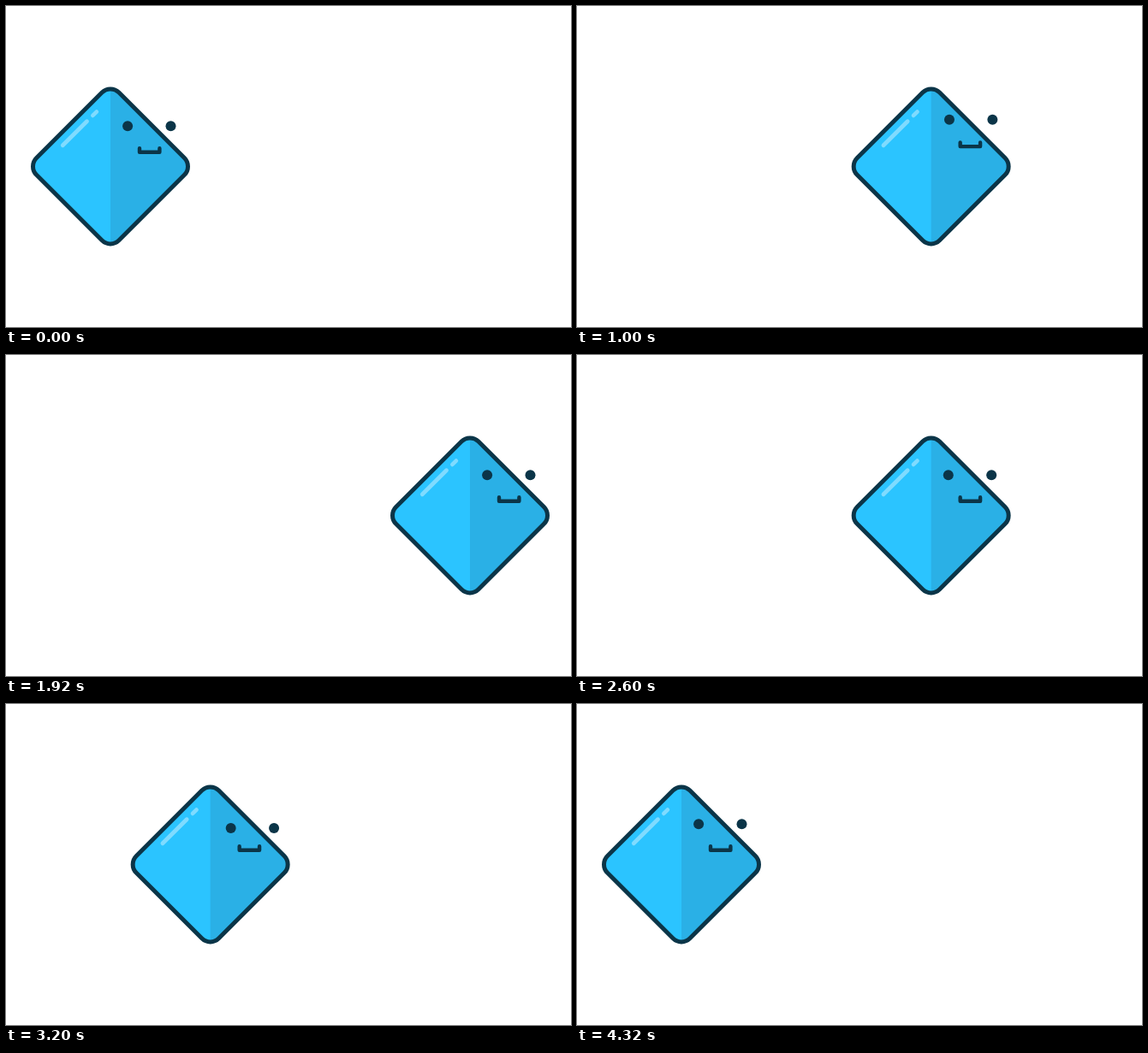
An HTML page with a canvas that plays this animation: 660x375 px, repeating every 4360 ms.

```html
<!DOCTYPE html>
<html>
<head>
<meta charset="utf-8">
<style>
  html, body { margin: 0; width: 100%; height: 100%; overflow: hidden; background: #fff; }
  canvas { display: block; }
</style>
</head>
<body>
<canvas id="stage" width="660" height="375"></canvas>
<script>
const ctx = document.getElementById('stage').getContext('2d');
const LOOP = 4360, STEP = 40, TRAVEL = 1440, TURN = 2160;
const LEFT = 122, SPAN = 420, MID = 187.4;
const INK = '#0b3548', LIGHT = '#2bc4ff', SHADE = '#2ab0e6', SHINE = '#7fdbff';

const clamp = v => Math.min(1, Math.max(0, v));
const smooth = v => { v = clamp(v); return v * v * (3 - 2 * v); };
// Rises from a to b, stays until c, falls back by d.
const bump = (t, a, b, c, d) => smooth((t - a) / (b - a)) * (1 - smooth((t - c) / (d - c)));

function diamond() {
  const tip = 96.3, r = 14, h = tip / 2;
  ctx.beginPath();
  ctx.moveTo(h, -h);
  ctx.arcTo(tip, 0, 0, tip, r);
  ctx.arcTo(0, tip, -tip, 0, r);
  ctx.arcTo(-tip, 0, 0, -tip, r);
  ctx.arcTo(0, -tip, tip, 0, r);
  ctx.closePath();
}

function line(color, width, ...pts) {
  ctx.strokeStyle = color;
  ctx.lineWidth = width;
  ctx.beginPath();
  pts.forEach(([x, y]) => ctx.lineTo(x, y));
  ctx.stroke();
}

function dot(x, y) {
  ctx.fillStyle = INK;
  ctx.beginPath();
  ctx.arc(x, y, 6, 0, 2 * Math.PI);
  ctx.fill();
}

function drawBody(stretch) {
  ctx.save();
  ctx.scale(stretch, 1);
  diamond();
  ctx.fillStyle = LIGHT;
  ctx.fill();
  ctx.save();
  ctx.clip();
  ctx.fillStyle = SHADE;
  ctx.fillRect(0, -100, 100, 200);
  ctx.restore();
  line(SHINE, 4.8, [-55.7, -24.6], [-27.5, -52.6]);
  line(SHINE, 4.8, [-20.6, -59.5], [-16.2, -63.8]);
  diamond();
  ctx.strokeStyle = INK;
  ctx.lineWidth = 5;
  ctx.stroke();
  ctx.restore();
}

function drawFace(lift, glance) {
  const ex = 1.2 * lift + 3.9 * glance;
  const ey = -47.2 - 7.4 * lift + 4.8 * glance;
  dot(20.1 + ex, ey);
  dot(70.5 + ex, ey);
  const y = -16.6 - 6.7 * lift;
  line(INK, 4.4, [34, y - 4.6], [34, y], [57.4, y], [57.4, y - 4.6]);
}

function draw(t) {
  const x = LEFT + SPAN * (clamp(t / TRAVEL) - clamp((t - TURN) / TRAVEL));
  const beat = (t + 960) % 1200;
  const squash = bump(beat, 0, 290, 290, 480);
  ctx.fillStyle = '#fff';
  ctx.fillRect(0, 0, 660, 375);
  ctx.save();
  ctx.translate(x, MID);
  ctx.lineCap = ctx.lineJoin = 'round';
  drawBody(1 + 0.018 * squash);
  drawFace(bump(t, 760, 960, 1040, 1240), bump(t, 2960, 3160, 3480, 3720));
  ctx.restore();
}

const start = performance.now();
function tick() {
  const t = (performance.now() - start) % LOOP;
  draw(Math.floor(t / STEP) * STEP);
  requestAnimationFrame(tick);
}
tick();
</script>
</body>
</html>
```
